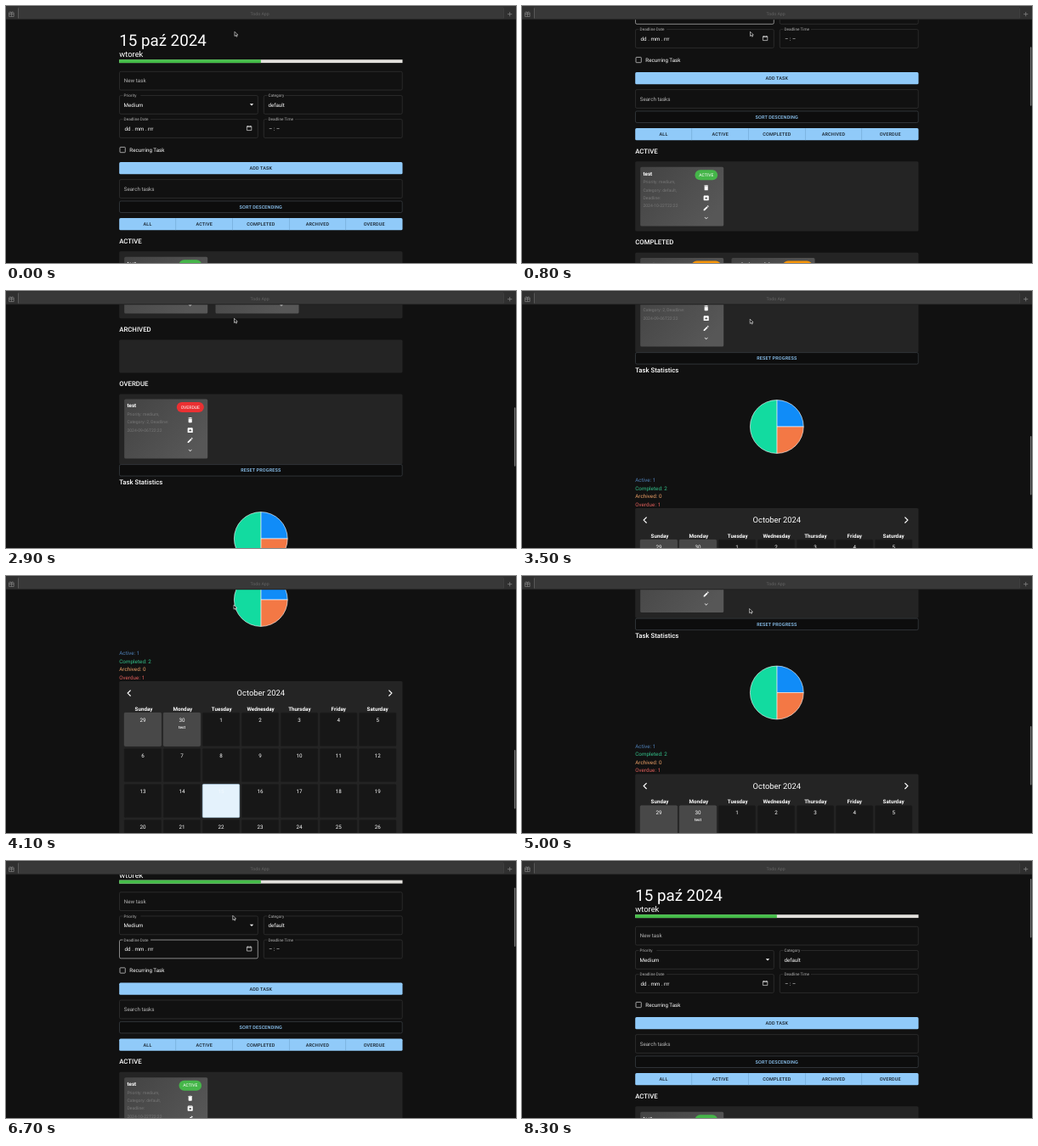
These frames come from a looping animation (600x303 px, 8400 ms). An HTML page:

```html
<!DOCTYPE html>
<html lang="pl">
<head>
<meta charset="utf-8">
<title>Todo App</title>
<style>
  html, body { margin: 0; width: 100%; height: 100%; overflow: hidden; background: #111; }
  svg { display: block; width: 600px; height: 303px; }
  text { font-family: Roboto, Arial, sans-serif; text-rendering: geometricPrecision; white-space: pre; }
</style>
</head>
<body>
<svg id="stage" viewBox="0 0 600 303" xmlns="http://www.w3.org/2000/svg"></svg>
<script>
const LOOP = 8400, STEP = 100;
const LEFT = 133.2, WIDTH = 333.3, MID = 299.8;
const BG = '#111', BLUE = '#90caf9', PAPER = '#242424', EDGE = '#3b3b3b';

const rect = (x, y, w, h, fill, r = 0, extra = '') =>
  `<rect x="${x}" y="${y}" width="${w}" height="${h}" rx="${r}" fill="${fill}" ${extra}/>`;
const text = (x, y, s, size = 6.25, fill = '#fff', weight = 400, anchor = 'start', spacing = 0) =>
  `<text x="${x}" y="${y}" font-size="${size}" fill="${fill}" font-weight="${weight}" text-anchor="${anchor}" letter-spacing="${spacing}">${s}</text>`;
const line = (d, stroke, width) =>
  `<path d="${d}" fill="none" stroke="${stroke}" stroke-width="${width}"/>`;
const icon = (x, y, d, scale = 0.34) =>
  `<path transform="translate(${x} ${y}) scale(${scale}) translate(-12 -12)" d="${d}" fill="#fff" fill-rule="evenodd"/>`;

const ICONS = [
  'M6 7H18V19Q18 21 16 21H8Q6 21 6 19ZM5 4H8.5L9.5 3H14.5L15.5 4H19V6H5Z',
  'M3 6L5.5 3H18.5L21 6V19Q21 21 19 21H5Q3 21 3 19ZM10 10V12H6.5L12 17.5L17.5 12H14V10ZM5.5 5.5H18.5L17.8 4.6H6.2Z',
  'M3 17.2L14 6.2L17.8 10L6.8 21H3ZM15.1 5.1L17.7 2.9L21.1 6.3L18.9 8.9Z',
  'M6 10L7.4 8.6L12 13.2L16.6 8.6L18 10L12 16Z'
];

const heading = (y, s) => text(LEFT, y, s, 7.8, '#fff', 500);
const paper = (y, h) => rect(LEFT, y, WIDTH, h, PAPER, 1.6);
const caption = (x, y, s, fill) => text(x, y, s, 5.47, fill, 500, 'middle', 0.15);

function field(x, y, w, label, value, valueX = x + 5.4) {
  const box = rect(x + 0.3, y, w - 0.6, 21.8, BG, 1.6,
    `class="field" stroke="${EDGE}" stroke-width=".6" data-top="${y}" data-x="${x}" data-w="${w}"`);
  if (!value) return box + text(x + 5.5, y + 12.9, label, 6.25, '#b4b4b4');
  const gap = label.length * 2.35 + 2;
  return box + rect(x + 4.3, y - 1, gap, 2, BG) +
    text(x + 5.4, y + 1.6, label, 4.7, '#b4b4b4') + text(valueX, y + 13.2, value);
}

const solidButton = (y, s) => rect(LEFT, y, WIDTH, 14.2, BLUE, 1.6) + caption(MID, y + 9.1, s, '#16202a');
const outlineButton = (y, s) =>
  rect(LEFT + 0.3, y, WIDTH - 0.6, 13.5, '#0d0d0d', 1.6, 'stroke="#454c52" stroke-width=".6"') +
  caption(MID, y + 8.8, s, BLUE);

function card(x, y, h, title, lines, status, color) {
  const split = status === 'COMPLETED';
  const chipW = split ? 34.5 : status === 'OVERDUE' ? 32 : 26.6;
  const chipX = x + 77.6 - chipW / 2, chipH = split ? 18 : 12;
  let out = rect(x, y, 98, h, 'url(#cardFill)', 1.6) + text(x + 3.2, y + 9.7, title, 6.25, '#fff', 700);
  lines.forEach((s, i) => out += text(x + 3.2, y + 19.3 + i * 9.4, s, 5, '#777', 400, 'start', 0.03));
  out += rect(chipX, y + 3.4, chipW, chipH, color, 6);
  out += split
    ? text(chipX + 4.6, y + 11.8, 'COMPLET', 5.1) + text(chipX + 4.6, y + 16.9, 'ED', 5.1)
    : text(x + 77.6, y + 11.2, status, 5.1, '#fff', 400, 'middle');
  ICONS.forEach((d, i) => out += icon(x + 77.5, y + (split ? 30.7 : 24.5) + i * 11.9, d));
  return out;
}

function form() {
  let out = text(LEFT, 46.6, '15 paź 2024', 18.75) + text(LEFT, 60.4, 'wtorek', 9.4) +
    rect(LEFT, 63.2, WIDTH, 3.9, '#e2e0dc') + rect(LEFT, 63.2, WIDTH / 2, 3.9, '#45bd49') +
    field(LEFT, 77.3, WIDTH, 'New task') +
    field(LEFT, 105.5, 163.4, 'Priority', 'Medium') +
    field(303, 105.5, 163.5, 'Category', 'default') +
    field(LEFT, 133.6, 163.4, 'Deadline Date', 'dd . mm . rrrr'.slice(0, -1), 139.6) +
    field(303, 133.6, 163.5, 'Deadline Time', '– : –', 309.2) +
    '<path d="M286.8 115.2H291.2L289 117.5Z" fill="#fff"/>' +
    line('M283.4 141.8H288.8V146.6H283.4ZM283.4 142.6H288.8M284.6 141V142M287.6 141V142', '#ddd', 0.7) +
    rect(134, 166.4, 6.3, 6.3, 'none', 0.7, 'stroke="#c4c4c4" stroke-width=".8"') +
    text(145.3, 171.8, 'Recurring Task') +
    solidButton(184.1, 'ADD TASK') +
    field(LEFT, 204.6, WIDTH, 'Search tasks') +
    outlineButton(230, 'SORT DESCENDING') +
    rect(LEFT, 250.1, WIDTH, 14.2, BLUE, 1.6);
  ['ALL', 'ACTIVE', 'COMPLETED', 'ARCHIVED', 'OVERDUE'].forEach((s, i) => {
    const x = LEFT + i * WIDTH / 5;
    if (i) out += rect(x - 0.2, 250.1, 0.4, 14.2, '#5f93bd');
    out += caption(x + WIDTH / 10, 259.2, s, '#16202a');
  });
  return out;
}

function taskLists() {
  const due = (priority, category, ...rest) => [`Priority: ${priority},`, `Category: ${category},`, ...rest];
  return heading(279.8, 'ACTIVE') + paper(289.2, 82.3) +
    card(139.2, 295.8, 69.7, 'test', due('medium', 'default', 'Deadline:', '2024-10-22T22:22'), 'ACTIVE', '#45b649') +
    heading(387.2, 'COMPLETED') + paper(396.8, 88.4) +
    card(139.2, 403.1, 76.4, 'cos tam', due('high', 'malowane', 'Deadline:', '2024-09-13T13:00'), 'COMPLETED', '#f79509') +
    card(246.5, 403.1, 76.4, 'zadanie z polaka', due('high', 'polski', 'Deadline:', '2024-09-27T10:00'), 'COMPLETED', '#f79509') +
    heading(500.8, 'ARCHIVED') + paper(510.6, 38.8) +
    heading(564.8, 'OVERDUE') + paper(574.6, 82.6) +
    card(139.2, 580.6, 70, 'test', ['Priority: medium,', 'Category: 2, Deadline:', '2024-09-06T22:22'], 'OVERDUE', '#ea3032') +
    outlineButton(657.6, 'RESET PROGRESS');
}

function statistics() {
  const cy = 745, r = 31.4;
  const slice = (d, fill) => `<path d="M${MID} ${cy}${d}Z" fill="${fill}" stroke="#fff" stroke-width=".6"/>`;
  const arc = (x, y) => `A${r} ${r} 0 0 1 ${x} ${y}`;
  const rows = [['Active: 1', '#4f80b8'], ['Completed: 2', '#34c48c'], ['Archived: 0', '#efa268'], ['Overdue: 1', '#e3605c']];
  return heading(680.8, 'Task Statistics') +
    slice(`V${cy - r}${arc(MID + r, cy)}`, '#108cf8') +
    slice(`H${MID + r}${arc(MID, cy + r)}`, '#f37845') +
    slice(`V${cy + r}${arc(MID, cy - r)}`, '#12dba0') +
    rows.map(([s, c], i) => text(LEFT, 810.3 + i * 9.4, s, 6.25, c, 400, 'start', 0.05)).join('');
}

function calendar() {
  const top = 878.3, pitch = 42.1, colX = i => 139.2 + i * 46.05;
  let out = rect(LEFT, 841, WIDTH, 252, PAPER, 1.6) +
    text(MID, 858.2, 'October 2024', 9.4, '#fff', 400, 'middle') +
    line('M146.6 851.7L143.2 855.1L146.6 858.5M450.4 851.7L453.8 855.1L450.4 858.5', '#fff', 1.2);
  ['Sunday', 'Monday', 'Tuesday', 'Wednesday', 'Thursday', 'Friday', 'Saturday'].forEach((s, i) =>
    out += text(162 + i * 45.85, 875.7, s, 6.25, '#fff', 700, 'middle'));
  for (let i = 0; i < 35; i++) {
    const date = new Date(2024, 8, 29 + i);
    const outside = date.getMonth() !== 9, today = !outside && date.getDate() === 15;
    const x = colX(i % 7), y = top + Math.floor(i / 7) * pitch;
    const fill = today ? '#e4f2fc' : outside ? '#484848' : '#171717';
    const edge = today ? '#b4dcf8' : outside ? '#555' : '#1d1d1d';
    out += rect(x, y, 43.4, 39.2, fill, 1.2, `stroke="${edge}" stroke-width=".5"`) +
      text(x + 21.7, y + 10.5, date.getDate(), 6.25, today ? '#f2f8fd' : '#fff', 400, 'middle');
    if (i === 1) out += text(x + 21.7, y + 18.2, 'test', 4.7, '#fff', 500, 'middle');
  }
  return out;
}

const windowBar = rect(0, 0, 600, 16, '#303030') + rect(14, 1, 571, 14.4, '#383838') +
  rect(14, 2.5, 0.7, 12, '#666') + rect(585, 2.5, 0.6, 12, '#484848') + rect(0, 15.5, 600, 0.7, '#1c1c1c') +
  text(298.5, 11, 'Todo App', 5.2, '#626262', 400, 'middle') +
  line('M3.6 7.8H9.2V12.4H3.6ZM3.6 9.6H9.2M6.4 7.8V12.4M4.6 6.6L6.4 7.8L8.2 6.6', '#858585', 0.7) +
  line('M592.7 7V12.2M590.1 9.6H595.3', '#8a8a8a', 0.7);

const stage = document.getElementById('stage');
stage.innerHTML =
  `<defs><linearGradient id="cardFill" x1="0" y1="0" x2="1" y2=".6">
    <stop offset="0" stop-color="#434343"/><stop offset="1" stop-color="#575757"/></linearGradient></defs>` +
  rect(0, 0, 600, 303, BG) +
  `<g id="page">${form()}${taskLists()}${statistics()}${calendar()}</g>` +
  rect(597.9, 0, 1.5, 69.5, '#747474', 0.75, 'id="thumb"') + windowBar +
  `<path id="cursor" d="M0 0V5.2L1.3 4.1L2.1 5.9L3 5.5L2.2 3.8H3.8Z" fill="#000" stroke="#fff" stroke-width=".6"/>`;

const page = document.getElementById('page');
const thumb = document.getElementById('thumb');
const cursor = document.getElementById('cursor');
const fields = [...document.querySelectorAll('.field')];

// Rows of [time, value...], joined by straight lines.
const SCROLL = [[0, 0], [100, 4], [800, 106], [1800, 303], [1900, 303], [2000, 316.5], [2900, 453],
  [4100, 717], [4600, 815], [4700, 815], [5300, 400], [5500, 400], [5800, 277], [5900, 277],
  [6800, 11], [7300, 0]];
const POINTER = [[0, 269, 30.3], [800, 268.5, 30.3], [2000, 268.5, 32.3], [2900, 268.5, 32.3],
  [4100, 268, 34], [5300, 267.5, 40], [5800, 266.8, 64.3], [7400, 266.8, 64.3], [8200, 300, -8]];

function at(rows, time, column = 1) {
  const next = rows.findIndex(row => row[0] > time);
  if (next < 0) return rows[rows.length - 1][column];
  if (next === 0) return rows[0][column];
  const a = rows[next - 1], b = rows[next];
  return a[column] + (b[column] - a[column]) * (time - a[0]) / (b[0] - a[0]);
}

function render(time) {
  const scroll = at(SCROLL, time), x = at(POINTER, time), y = at(POINTER, time, 2);
  page.setAttribute('transform', `translate(0 ${-scroll})`);
  cursor.setAttribute('transform', `translate(${x} ${y})`);
  thumb.setAttribute('y', 21 + scroll * 0.2566);
  thumb.setAttribute('visibility', time < STEP ? 'hidden' : 'visible');
  // Hover trails the scrolling a little.
  const hoverY = y + at(SCROLL, time - 150);
  for (const box of fields) {
    const { top, x: left, w } = box.dataset;
    const over = y > 16 && hoverY > +top && hoverY < +top + 21.8 && x > +left && x < +left + +w;
    box.setAttribute('stroke', over ? '#d8d8d8' : EDGE);
  }
}

const start = performance.now();
function tick() {
  const time = (performance.now() - start) % LOOP;
  render(Math.floor(time / STEP) * STEP);
  requestAnimationFrame(tick);
}
render(0);
tick();
</script>
</body>
</html>
```
